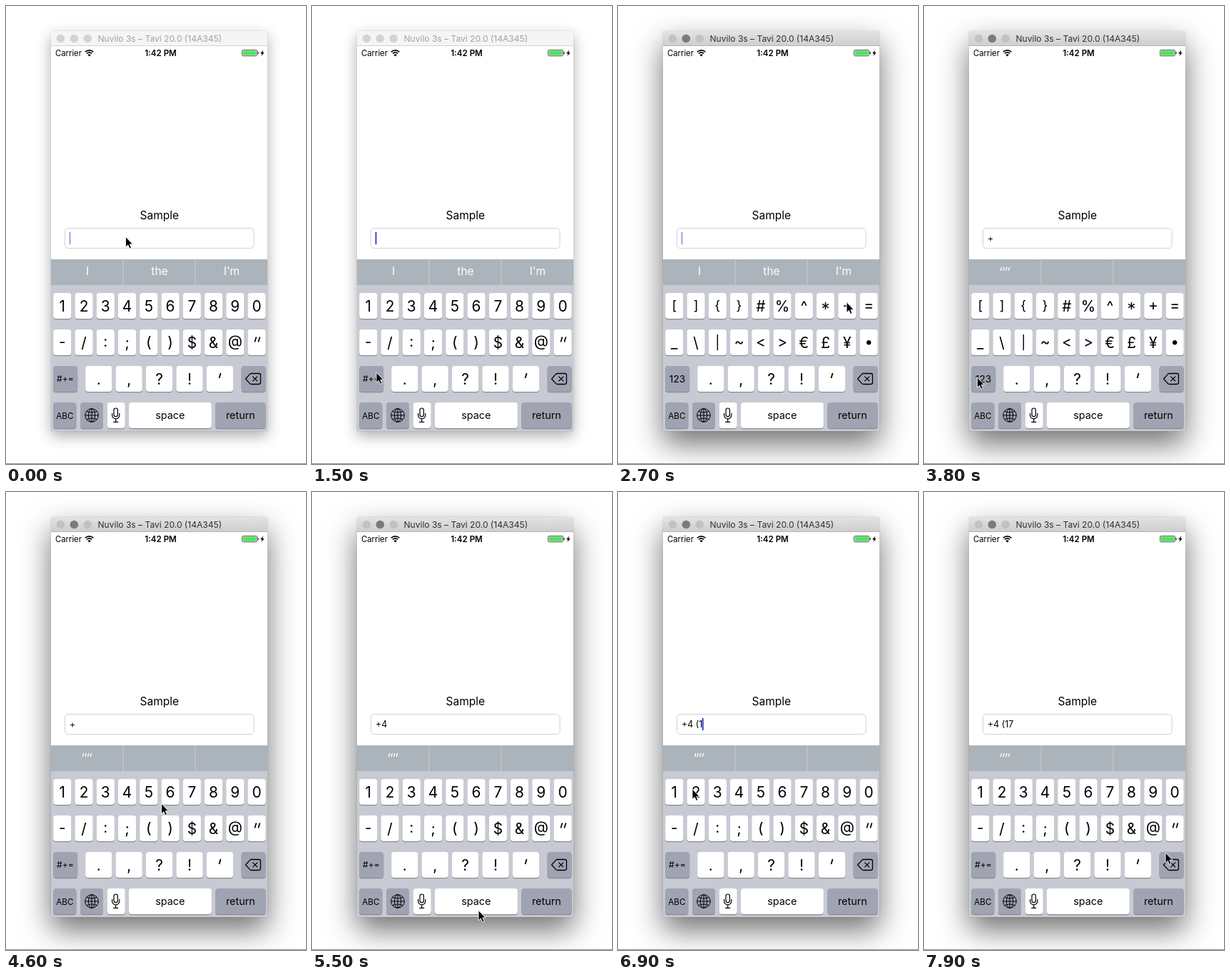
Animation, 420 px wide and 640 px high, one loop 8000 ms. Source, as an HTML page:

```html
<!DOCTYPE html>
<html lang="en">
<head>
<meta charset="utf-8">
<title>Keyboard demo</title>
<style>
  html, body { margin: 0; width: 100%; height: 100%; overflow: hidden; background: #fff; }
  #win { position: absolute; left: 63px; top: 35px; width: 303px; height: 559px; border-radius: 4px 4px 0 0;
    box-shadow: 0 0 1px rgba(0,0,0,.4), 0 7px 20px rgba(0,0,0,.32); }
  #win.active { box-shadow: 0 0 1px rgba(0,0,0,.5), 0 18px 42px rgba(0,0,0,.56); }
  svg { position: absolute; left: 0; top: 0; }
  text { font-family: Inter, "Open Sans", sans-serif; }
  .char { font-feature-settings: "case"; }
</style>
</head>
<body>
<div id="win"></div>
<svg id="stage" width="420" height="640" viewBox="0 0 420 640"></svg>
<script>
const LOOP = 8000, STEP = 100, BLINK = 900;
const LEFT = 63, WIDTH = 303, GRAY = '#a0a4b2';
const $ = id => document.getElementById(id);
const esc = s => s.replace(/&/g, '&amp;').replace(/</g, '&lt;').replace(/>/g, '&gt;');

const text = (s, x, y, size, more = '') =>
  `<text x="${x}" y="${y}" font-size="${size}" ${more}>${esc(s)}</text>`;
const mid = (s, x, y, size, more = '') => text(s, x, y, size, 'text-anchor="middle" ' + more);
const rect = (x, y, w, h, fill, more = '') =>
  `<rect x="${x}" y="${y}" width="${w}" height="${h}" fill="${fill}" ${more}/>`;
const line = (d, width, color = '#000') =>
  `<path d="${d}" fill="none" stroke="${color}" stroke-width="${width}" stroke-linejoin="round"/>`;
const key = (x, y, w, fill = '#fff') =>
  rect(x, y + 1, w, 36.2, '#888b92', 'rx="4"') + rect(x, y, w, 36, fill, 'rx="4"');

// Slanted straight quote marks
const ticks = (x, y, n, h, gap, width, color) => {
  let d = '';
  for (let i = 0; i < n; i++) d += `M${x + i * gap + h * .25} ${y}l${-h * .3} ${h}`;
  return line(d, width, color);
};

const rowY = i => 401 + 51 * i;
const colX = i => 66.2 + 30.25 * i;

// One key label; brackets and bars are set smaller
function glyph(c, x, y) {
  if (c === '"') return ticks(x - 2.4, y + 10.5, 2, 7, 5, 1.7, '#000');
  if (c === "'") return ticks(x - .6, y + 10, 1, 7, 0, 1.8, '#000');
  const tall = /[[\]{}|]/.test(c);
  return mid(c, x, y + (tall ? 24.8 : 25.5), tall ? 18.5 : 20.8, 'class="char"');
}
const chars = (str, row) => [...str].map((c, i) => glyph(c, colX(i) + 12.6, rowY(row))).join('');

function titleBar() {
  const dots = [0, 1, 2].map(i =>
    `<circle id="dot${i}" cx="${76.5 + 18.85 * i}" cy="45.5" r="5.8"/>`).join('');
  return '<linearGradient id="metal" x2="0" y2="1"><stop stop-color="#e4e3e4"/>' +
    '<stop offset="1" stop-color="#cfcecf"/></linearGradient>' +
    '<path id="bar" d="M63 55.5V39a4 4 0 0 1 4-4H362a4 4 0 0 1 4 4V55.5Z"/>' +
    rect(LEFT, 55, WIDTH, 1, '', 'id="rule"') + dots +
    text('Nuvilo 3s – Tavi 20.0 (14A345)', 128.5, 50, 12.05, 'id="title"');
}

function statusBar() {
  const arc = r => {
    const k = r * .72;
    return `M${116.6 - k} ${70 - k}A${r} ${r} 0 0 1 ${116.6 + k} ${70 - k}`;
  };
  return text('Carrier', 69, 70, 11.3) +
    line(arc(8) + arc(5), 1.7) + '<path d="M116.6 70.5l-2.2-2.3a3.2 3.2 0 0 1 4.4 0z"/>' +
    mid('1:42 PM', 216.5, 70, 11.6, 'font-weight="600"') +
    rect(330.5, 61.5, 21, 8.3, '#fff', 'rx="1.6" stroke="#333" stroke-width=".8"') +
    rect(331.6, 62.6, 18.8, 6.1, '#4be35f', 'rx=".6"') +
    rect(352.4, 64, 1.4, 3.3, '#444', 'rx=".6"') +
    '<path d="M360.2 61.5l-4.2 4.7h2.4l-1 3.8 4.2-4.9h-2.4z"/>';
}

function icons() {
  const del = line('M335.5 521l6-6.6q.8-.9 2-.9h10.5q2.4 0 2.4 2.4v10.2q0 2.4-2.4 2.4h-10.5q-1.2 0-2-.9z' +
    'M345.3 517.6l6.8 6.8M352.1 517.6l-6.8 6.8', 1.3);
  const globe = '<g fill="none" stroke="#000"><circle cx="120" cy="572" r="9.3"/>' +
    '<ellipse cx="120" cy="572" rx="4.6" ry="9.3"/></g>' +
    line('M120 562.7v18.6M110.7 572h18.6M112.7 566.3q7.3 3.4 14.6 0M112.7 577.7q7.3-3.4 14.6 0', 1);
  const mic = rect(151, 562, 5.4, 11.8, 'none', 'rx="2.7" stroke="#000" stroke-width="1.2"') +
    line('M148.6 569v2.7a5.1 5.1 0 0 0 10.2 0v-2.7M153.7 577v4M150.2 581.3h7', 1.2);
  return del + globe + mic;
}

function keyboard() {
  const y3 = rowY(2), y4 = rowY(3);
  let s = rect(LEFT, 390, WIDTH, 204, '#c8cad3') + rect(LEFT, 354, WIDTH, 36, '#acb4bb');
  for (const i of [1, 2]) s += rect(62.5 + 101 * i, 354, 1, 36, '#c6ccd1');
  for (let i = 0; i < 10; i++) s += key(colX(i), rowY(0), 25.2) + key(colX(i), rowY(1), 25.2);
  s += key(66.2, y3, 34, GRAY) + key(329.5, y3, 34, GRAY);
  [...".,?!'"].forEach((c, i) => {
    const x = 111.2 + 42.4 * i;
    s += key(x, y3, 37.2) + glyph(c, x + 18.6, y3);
  });
  s += key(66.2, y4, 32.2, GRAY) + key(104, y4, 32, GRAY) + key(141.7, y4, 25) +
    key(172, y4, 115.8) + key(293.3, y4, 70.3, GRAY) + icons() +
    mid('ABC', 82.3, 576.5, 11.7) + mid('space', 229.8, 576.8, 14.4) + mid('return', 328.4, 576.8, 14.4);
  const digits = chars('1234567890', 0) + chars('-/:;()$&@"', 1) + mid('#+=', 83, 525.3, 12.2);
  const signs = chars('[]{}#%^*+=', 0) + chars('_\\|~<>€£¥•', 1) + mid('123', 83, 525.6, 13.7);
  const words = ['I', 'the', "I'm"].map((w, i) => mid(w, 114 + 101 * i, 376, 15.5)).join('');
  return s + `<g id="digits">${digits}</g><g id="signs">${signs}</g>` +
    `<g id="words" fill="#fff">${words}</g>` +
    `<g id="quotes">${ticks(107.6, 365, 4, 5, 3.6, 1.3, '#fff')}</g>`;
}

$('stage').innerHTML =
  rect(0, 639, 420, 1, '#8e8e8e') + rect(LEFT, 55, WIDTH, 539, '#fff') +
  titleBar() + statusBar() + mid('Sample', 214.8, 298, 15.5) +
  rect(82.5, 310.5, 264.5, 28, '#fff', 'rx="4.5" stroke="#d2d2d2"') +
  text('', 89, 329, 12.4, 'id="entry"') + rect(0, 316, 2, 17, '#3541cf', 'id="caret"') +
  keyboard() +
  '<path id="mouse" d="M0 0V14.4L3.3 11.4 5.5 16.4 7.9 15.3 5.8 10.4H10Z" stroke="#fff" stroke-width=".9"/>';

// Pointer moves: start, end, x, y
const MOVES = [
  [0, 200, 265, 574], [500, 1300, 90, 512], [2200, 2700, 320, 414], [3400, 3800, 74.5, 519],
  [4000, 4800, 244, 420], [5100, 5500, 233, 584.5], [5600, 6200, 79, 416],
  [6600, 6900, 104, 415], [7100, 7500, 150, 434], [7700, 7900, 338, 504]
];
// Key presses; the first entry sets the blink phase before typing
const TYPED = [[-BLINK / 2, ''], [3000, '+'], [4800, '+4'], [6500, '+4 (1'], [7100, '+4 (17']];

const clamp = v => Math.min(1, Math.max(0, v));
const ease = k => k * k * (3 - 2 * k);
const show = (id, on) => $(id).setAttribute('visibility', on ? 'visible' : 'hidden');
const fill = (id, color) => $(id).setAttribute('fill', color);

function pointer(t) {
  let x = 167.5, y = 322.5;
  for (const [start, end, toX, toY] of MOVES) {
    const k = ease(clamp((t - start) / (end - start)));
    x += (toX - x) * k;
    y += (toY - y) * k;
  }
  return `translate(${x} ${y})`;
}

const blink = s => clamp(.5 + 2 * Math.cos(2 * Math.PI * (s / BLINK - .25)));

function draw(t) {
  const active = t >= 1600, signs = t >= 1800 && t < 4000;
  $('win').className = active ? 'active' : '';
  fill('bar', active ? 'url(#metal)' : '#f5f5f5');
  fill('rule', active ? '#b6b6b6' : '#d4d4d4');
  fill('title', active ? '#303030' : '#a2a2a2');
  for (const i of [0, 1, 2]) fill('dot' + i, !active ? '#d3d3d3' : i === 1 ? '#7c7b7c' : '#c3c2c3');
  show('signs', signs);
  show('digits', !signs);
  show('words', t < 3000);
  show('quotes', t >= 3100);

  const [since, entry] = TYPED.filter(r => r[0] <= t).pop();
  $('entry').textContent = entry;
  $('caret').setAttribute('x', 88.5 + $('entry').getComputedTextLength());
  $('caret').setAttribute('opacity', blink(t - since));
  $('mouse').setAttribute('transform', pointer(t));
}

function tick() {
  draw(Math.floor(performance.now() % LOOP / STEP) * STEP);
  requestAnimationFrame(tick);
}
tick();
</script>
</body>
</html>
```
